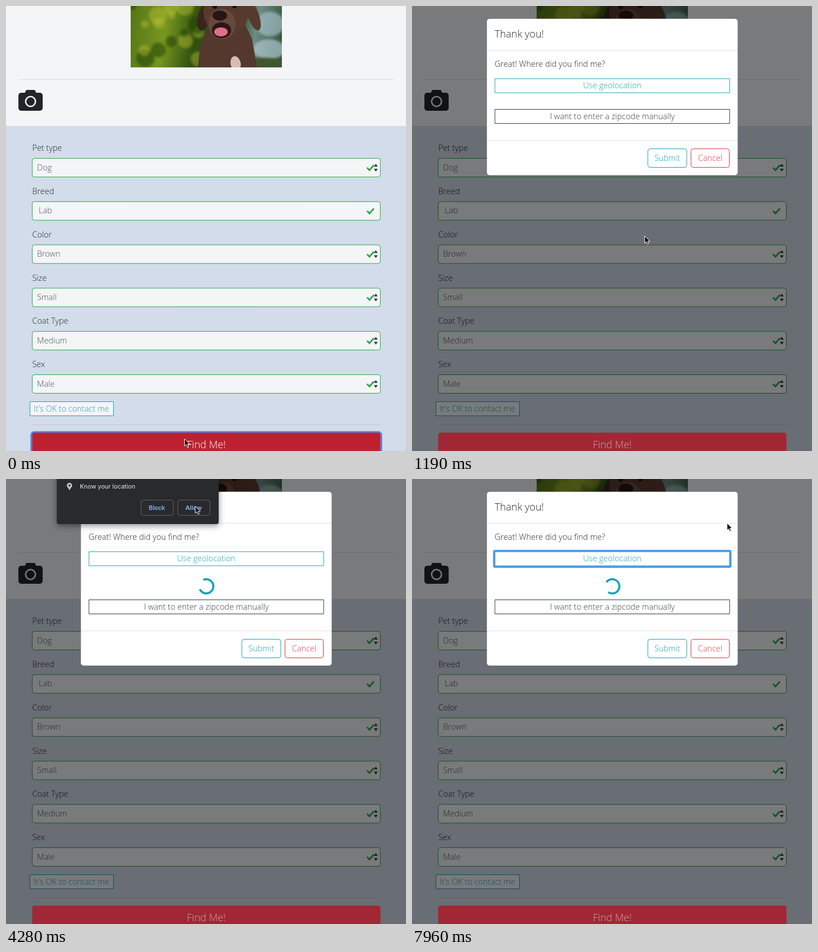
An HTML page with a canvas that plays this animation: 709 by 790 pixels, repeating every 8 s.

```html
<!DOCTYPE html>
<html lang="en">
<head>
<meta charset="utf-8">
<title>Found pet form</title>
<style>
html, body { margin: 0; width: 100%; height: 100%; overflow: hidden; }
canvas { display: block; width: 709px; height: 790px; }
</style>
</head>
<body>
<canvas id="stage" width="709" height="790"></canvas>
<script>
const ctx = document.getElementById('stage').getContext('2d');
const LOOP = 8000, STEP = 147.4;
const INK = '#212529', TEAL = '#17a2b8', RED = '#dc3545', GREEN = '#28a745', PAPER = '#f4f5f7';
const FIELDS = [['Pet type', 'Dog'], ['Breed', 'Lab'], ['Color', 'Brown'],
  ['Size', 'Small'], ['Coat Type', 'Medium'], ['Sex', 'Male']];

// Pointer path: step, x, y
const POINTER = [[0, 316, 768], [4, 316, 768], [8, 412, 408], [9, 405, 385], [13, 347, 136], [19, 347, 136],
  [22, 348, 128], [24, 347, 122], [28, 335, 48], [32, 334, 46], [35, 345, 52], [39, 441, 92], [46, 558, 78], [60, 558, 78]];

const clamp = v => Math.max(0, Math.min(1, v));
const mix = (a, b, p) => a + (b - a) * p;

// cubic-bezier(0, 0, .58, 1)
function easeOut(p) {
  let lo = 0, hi = 1;
  for (let i = 0; i < 20; i++) {
    const s = (lo + hi) / 2;
    if (3 * (1 - s) * s * s * .58 + s ** 3 < p) lo = s; else hi = s;
  }
  return 3 * lo * lo - 2 * lo ** 3;
}

function pointerAt(step) {
  const i = POINTER.findIndex(p => p[0] > step);
  const [s0, x0, y0] = POINTER[i - 1], [s1, x1, y1] = POINTER[i];
  const p = (step - s0) / (s1 - s0), e = p * p * (3 - 2 * p);
  return [mix(x0, x1, e), mix(y0, y1, e)];
}

function text(s, x, cy, color, size = 14.4, align = 'left', font = '"Open Sans", sans-serif', weight = 300) {
  ctx.font = `${weight} ${size}px ${font}`;
  ctx.textAlign = align;
  ctx.fillStyle = color;
  ctx.fillText(s, x, cy + size * .36);
}

function box(x, y, w, h, r, fill, stroke, line = 1) {
  ctx.beginPath();
  ctx.roundRect(x, y, w, h, r);
  if (fill) { ctx.fillStyle = fill; ctx.fill(); }
  if (stroke) { ctx.strokeStyle = stroke; ctx.lineWidth = line; ctx.stroke(); }
}

function shape(color, points) {
  ctx.beginPath();
  points.forEach(([x, y]) => ctx.lineTo(x, y));
  ctx.closePath();
  ctx.fillStyle = color;
  ctx.fill();
}

function oval(x, y, rx, ry, color, turn = 0) {
  ctx.beginPath();
  ctx.ellipse(x, y, rx, ry, turn, 0, 7);
  ctx.fillStyle = color;
  ctx.fill();
}

function rule(x, y, w, color = 'rgba(0,0,0,.1)') {
  ctx.fillStyle = color;
  ctx.fillRect(x, y, w, 1);
}

function photo() {
  ctx.save();
  ctx.beginPath();
  ctx.rect(221, 0, 268, 109);
  ctx.clip();
  const g = ctx.createLinearGradient(221, 0, 489, 50);
  [[0, '#557516'], [.25, '#779620'], [.45, '#31500f'], [.7, '#2d4a25'], [.83, '#6d8c83'], [1, '#39563d']]
    .forEach(([at, c]) => g.addColorStop(at, c));
  ctx.fillStyle = g;
  ctx.fillRect(221, 0, 268, 109);
  ctx.filter = 'blur(2px)';
  for (let i = 0; i < 16; i++) {
    const x = 224 + (i * 47) % 118, y = (i * 31) % 108;
    oval(x, y, 7 + i % 4 * 3, 7 + i % 4 * 3, i % 3 ? 'rgba(190,195,55,.42)' : 'rgba(30,65,8,.55)');
  }
  oval(468, 32, 25, 22, 'rgba(165,195,205,.65)');
  oval(466, 77, 28, 18, 'rgba(175,200,210,.7)');
  oval(455, 105, 45, 13, '#40572e');
  ctx.filter = 'none';
  shape('#54382d', [[340, 109], [344, 72], [355, 44], [366, 30], [420, 25], [436, 58], [445, 109]]);
  oval(351, 20, 11, 24, '#3b241d', .25);
  oval(438, 16, 10, 29, '#563a2f', -.35);
  oval(390, 10, 40, 43, '#57392e');
  oval(383, 32, 24, 27, '#68483a');
  oval(370, 1, 4, 4, '#15100f');
  oval(405, 0, 4, 4, '#15100f');
  oval(382, 43, 17, 14, '#2b1715');
  oval(381, 46, 12, 8, '#dc6f8a');
  oval(379, 17, 13, 9, '#241714');
  oval(407, 102, 9, 13, '#d3bdb5', -.2);
  ctx.restore();
}

function camera() {
  box(22, 154, 43, 32, 5, '#212529');
  shape('#212529', [[33, 155], [36, 149], [51, 149], [54, 155]]);
  ctx.beginPath();
  ctx.arc(43.5, 169.5, 8.7, 0, 7);
  ctx.strokeStyle = PAPER;
  ctx.lineWidth = 2.6;
  ctx.stroke();
}

function field([label, value], i) {
  const y = 270.5 + i * 76.8, mid = y + 16.5, isSelect = label !== 'Breed';
  text(label, 46.5, y - 18.5, INK);
  box(46.5, y, 617, 33, 4, PAPER, GREEN);
  text(value, isSelect ? 55 : 58, mid - .5, '#495057');
  ctx.beginPath();
  ctx.moveTo(640, mid);
  ctx.lineTo(644.3, mid + 4.5);
  ctx.lineTo(652, mid - 4.5);
  ctx.strokeStyle = GREEN;
  ctx.lineWidth = 2.8;
  ctx.stroke();
  if (isSelect) {
    shape('#343a40', [[652, mid - 2], [655.5, mid - 7], [659, mid - 2]]);
    shape('#343a40', [[652, mid + 2], [655.5, mid + 7], [659, mid + 2]]);
  }
}

function page() {
  ctx.fillStyle = PAPER;
  ctx.fillRect(0, 0, 709, 213);
  ctx.fillStyle = '#d3dcea';
  ctx.fillRect(0, 213, 709, 577);
  photo();
  rule(22, 130, 666);
  camera();
  FIELDS.forEach(field);
  box(42.5, 702.5, 148, 25, 0, PAPER, TEAL);
  text("It's OK to contact me", 49, 714.5, TEAL);
  rule(46, 743, 618);
}

function findButton(step) {
  if (step < 4) box(45, 756.5, 620, 50, 5, null, step ? (step > 1 ? '#35437e' : '#43579c') : '#5c80d8', 3.5);
  box(46.5, 757.5, 617, 50, 4, ['#bd2130', '#90242f', '#701c25'][step] || '#a02733');
  text('Find Me!', 355, 779, ['#ffffff', '#b3a6a8', '#9c8f91'][step] || '#c0a8ab', 18, 'center');
}

function spinner(time) {
  const gap = (time * .48 - 51) * Math.PI / 180;
  ctx.beginPath();
  ctx.arc(355, 190.5, 12.6, gap + Math.PI / 4, gap + Math.PI * 7 / 4);
  ctx.strokeStyle = TEAL;
  ctx.lineWidth = 3.6;
  ctx.stroke();
}

function modal(time, step) {
  const age = time - 187;
  if (age < 0) return;
  const grow = step >= 16 ? 31 : 0;
  const hover = step === 12 ? .6 : step > 12 && step < 18 ? 1 : 0;
  const focus = step === 16 || step === 17 || step >= 30;
  ctx.save();
  ctx.globalAlpha = clamp(age / 150);
  ctx.translate(0, -50 * (1 - easeOut(clamp(age / 300))));
  box(132.5, 22.5, 445, 278 + grow, 5, '#fff', 'rgba(0,0,0,.2)');
  text('Thank you!', 146.5, 50, INK, 18);
  rule(133, 78, 444, '#dee2e6');
  text('Great! Where did you find me?', 146.5, 103, INK);
  box(147, 129, 416, 25, 0, `rgba(23,162,184,${hover})`, TEAL);
  if (focus) box(145.5, 127.5, 419, 28.5, 2, null, '#4599ec', 3.6);
  text('Use geolocation', 355, 141, hover ? '#fff' : TEAL, 14.4, 'center');
  if (grow) spinner(time);
  ctx.translate(0, grow);
  box(147, 183.5, 416, 25, 0, null, '#343a40');
  text('I want to enter a zipcode manually', 355, 195.5, '#343a40', 14.4, 'center');
  rule(133, 238, 444, '#dee2e6');
  box(418, 253.5, 69, 33, 4, null, TEAL);
  text('Submit', 452.5, 269.5, TEAL, 14.4, 'center');
  box(494.5, 253.5, 68, 33, 4, null, RED);
  text('Cancel', 528.5, 269.5, RED, 14.4, 'center');
  ctx.restore();
}

function permissionPopup() {
  const ui = 'Inter, sans-serif';
  ctx.save();
  ctx.shadowColor = 'rgba(0,0,0,.45)';
  ctx.shadowBlur = 12;
  ctx.shadowOffsetY = 3;
  box(90, -20, 287, 100, 4, '#292a2d');
  ctx.restore();
  shape('#bdc1c6', [[108.3, 13], [112.5, 20], [116.7, 13]]);
  oval(112.5, 11.5, 4.7, 4.7, '#bdc1c6');
  oval(112.5, 11.5, 1.7, 1.7, '#292a2d');
  text('Know your location', 131, 13, '#e8eaed', 10.8, 'left', ui, 400);
  [['Block', 239], ['Allow', 304]].forEach(([label, x]) => {
    box(x + .5, 37.5, 57, 27, 4, null, '#5f6368');
    text(label, x + 28.5, 51, '#8ab4f8', 10.8, 'center', ui, 600);
  });
}

function pointer(x, y) {
  ctx.save();
  ctx.translate(x, y);
  ctx.beginPath();
  [[.5, .5], [.5, 13], [3.4, 10.4], [5.4, 15], [7.6, 14], [5.6, 9.6], [9.5, 9.4]].forEach(p => ctx.lineTo(...p));
  ctx.closePath();
  ctx.fillStyle = '#000';
  ctx.fill();
  ctx.strokeStyle = '#fff';
  ctx.lineWidth = 1;
  ctx.stroke();
  ctx.restore();
}

function draw(now) {
  const step = Math.floor((now % LOOP + 5) / STEP), time = step * STEP;
  page();
  ctx.fillStyle = `rgba(0,0,0,${.5 * clamp((time - 39) / 150)})`;
  ctx.fillRect(0, 0, 709, 790);
  findButton(step);
  modal(time, step);
  if (step >= 18 && step < 30) permissionPopup();
  pointer(...pointerAt(step));
  requestAnimationFrame(draw);
}

const start = performance.now();
draw(0);
function tick() { return performance.now() - start; }
</script>
</body>
</html>
```
